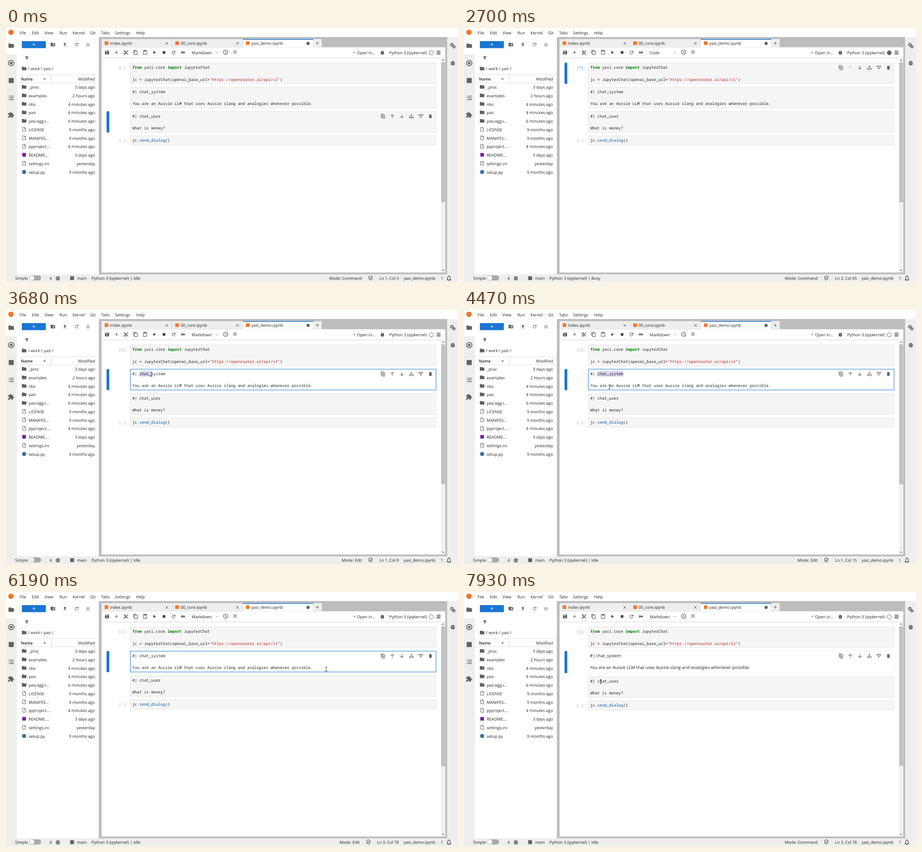
Recreate the animation shown at these times as an HTML page. Size 998 px wide and 561 px high, loop 8 s.

```html
<!DOCTYPE html>
<html lang="en">
<head>
<meta charset="utf-8">
<title>Notebook session</title>
<style>
html, body { margin: 0; width: 100%; height: 100%; overflow: hidden; background: #fff; }
svg { display: block; }
text { font: 9px "Open Sans", "Noto Sans", sans-serif; fill: #212121; white-space: pre; text-rendering: geometricPrecision; }
.mono { font: 8.65px "Noto Sans Mono", "DejaVu Sans Mono", monospace; }
.md { font-size: 9.6px; }
.end { text-anchor: end; }
.head { font-weight: 600; }
.kw { fill: #008000; font-weight: 700; }
.op { fill: #aa22ff; font-weight: 700; }
.str { fill: #ba2121; }
.prop { fill: #0055aa; }
</style>
</head>
<body>
<svg width="998" height="561" viewBox="0 0 998 561"><g id="frame"></g><g id="live"></g></svg>
<script>
const LOOP = 8000, CH = 5.19, BLUE = '#1976d2', GREY = '#616161', DARK = '#424242', GAP = '#bdbdbd', PALE = '#eeeeee';

// Filled icons on a 24 unit grid
const fills = {
  folder: 'M10 4H4c-1.1 0-2 .9-2 2v12c0 1.1.9 2 2 2h16c1.1 0 2-.9 2-2V8c0-1.1-.9-2-2-2h-8z',
  newFolder: 'M20 6h-8l-2-2H4c-1.1 0-2 .9-2 2v12c0 1.1.9 2 2 2h16c1.1 0 2-.9 2-2V8c0-1.1-.9-2-2-2zm-1 8h-3v3h-2v-3h-3v-2h3V9h2v3h3z',
  file: 'M14 2H6c-1.1 0-2 .9-2 2v16c0 1.1.9 2 2 2h12c1.1 0 2-.9 2-2V8zM6 20V4h7v5h5v11z',
  save: 'M17 3H5c-1.1 0-2 .9-2 2v14c0 1.1.9 2 2 2h14c1.1 0 2-.9 2-2V7zm-5 16a3 3 0 110-6 3 3 0 010 6zm3-10H5V5h10z',
  add: 'M19 13h-6v6h-2v-6H5v-2h6V5h2v6h6z',
  cut: 'M9.6 7.6C9.9 7.1 10 6.6 10 6a4 4 0 10-4 4c.6 0 1.1-.1 1.6-.4L10 12l-2.4 2.4A4 4 0 1010 18c0-.6-.1-1.1-.4-1.6L12 14l7 7h3v-1zM6 8a2 2 0 110-4 2 2 0 010 4zm0 12a2 2 0 110-4 2 2 0 010 4zM19 3l-6 6 2 2 7-7V3z',
  copy: 'M16 1H4c-1.1 0-2 .9-2 2v14h2V3h12zm3 4H8c-1.1 0-2 .9-2 2v14c0 1.1.9 2 2 2h11c1.1 0 2-.9 2-2V7c0-1.1-.9-2-2-2zm0 16H8V7h11z',
  paste: 'M19 2h-4.2a3 3 0 00-5.6 0H5c-1.1 0-2 .9-2 2v16c0 1.1.9 2 2 2h14c1.1 0 2-.9 2-2V4c0-1.1-.9-2-2-2zm-7 0a1 1 0 110 2 1 1 0 010-2zm7 18H5V4h2v3h10V4h2z',
  play: 'M7 5v14l11-7z',
  stop: 'M6 6h12v12H6z',
  skip: 'M4 18l8.5-6L4 6zm9-12v12l8.5-6z',
  reload: 'M17.65 6.35A8 8 0 1019.73 14h-2.08A6 6 0 1112 6c1.66 0 3.14.69 4.22 1.78L13 11h7V4z',
  upload: 'M5 20h14v-2H5zM5 10h4v6h6v-6h4l-7-7z',
  bug: 'M20 8h-2.8a6 6 0 00-1.8-2L17 4.4 15.6 3l-2.2 2.2a6 6 0 00-2.8 0L8.4 3 7 4.4 8.6 6a6 6 0 00-1.8 2H4v2h2.1L6 12H4v2h2l.1 2H4v2h2.8a6 6 0 0010.4 0H20v-2h-2.1l.1-2h2v-2h-2l-.1-2H20zm-6 8h-4v-2h4zm0-4h-4v-2h4z',
  funnel: 'M3 4h18l-7 9v8l-4-3v-5z',
  puzzle: 'M20.5 11H19V7c0-1.1-.9-2-2-2h-4V3.5a2.5 2.5 0 00-5 0V5H4c-1.1 0-2 .9-2 2v3.8h1.5a2.7 2.7 0 010 5.4H2V20c0 1.1.9 2 2 2h3.8v-1.5a2.7 2.7 0 015.4 0V22H17c1.1 0 2-.9 2-2v-4h1.5a2.5 2.5 0 000-5z',
  list: 'M2 4h3v3H2zm5 0h15v3H7zm-5 7h3v3H2zm5 0h15v3H7zm-5 7h3v3H2zm5 0h15v3H7z',
  menu: 'M2 3h20v3.5H2zm0 7h20v3.5H2zm0 7h20v3.5H2z',
  trash: 'M6 19c0 1.1.9 2 2 2h8c1.1 0 2-.9 2-2V7H6zM19 4h-3.5l-1-1h-5l-1 1H5v2h14z',
  bell: 'M12 22a2 2 0 002-2h-4a2 2 0 002 2zm6-6v-5c0-3.1-1.6-5.6-4.5-6.3V4a1.5 1.5 0 00-3 0v.7C7.6 5.4 6 7.9 6 11v5l-2 2v1h16v-1zm-2 1H8v-6c0-2.5 1.5-4.5 4-4.5s4 2 4 4.5z',
  shield: 'M12 1L3 5v6c0 5.6 3.8 10.7 9 12 5.2-1.3 9-6.4 9-12V5zm7 10c0 4.5-3 8.7-7 9.9C8 19.7 5 15.5 5 11V6.3l7-3.1 7 3.1zM7.4 11.6L6 13l4 4 8-8-1.4-1.4L10 14.2z',
  recStop: 'M12 1a11 11 0 100 22 11 11 0 000-22zm0 3a8 8 0 110 16 8 8 0 010-16zM8 8v8h8V8z'
};
// Outlined icons on the same grid
const lines = {
  up: 'M12 21V4M4 12l8-8 8 8',
  down: 'M12 3v17M4 12l8 8 8-8',
  above: 'M3 15h18v5H3zM12 13V4M8 8l4-4 4 4',
  below: 'M3 4h18v5H3zM12 11v9M8 16h8',
  dup: 'M8 6h13v16H8zM4 18V2h13M14.500 10v8M10.500 14h8',
  close: 'M5 5l14 14M19 5L5 19',
  chevron: 'M5 9l7 7 7-7',
  clock: 'M12 2a10 10 0 100 20 10 10 0 000-20zM12 6v7l5 2',
  chip: 'M6 6h12v12H6zM10 10h4v4h-4zM9 2v4M15 2v4M9 18v4M15 18v4M2 9h4M2 15h4M18 9h4M18 15h4'
};

const rect = (x, y, w, h, fill, more = '') => `<rect x="${x}" y="${y}" width="${w}" height="${h}" fill="${fill}" ${more}/>`;
const circle = (x, y, r, fill, more = '') => `<circle cx="${x}" cy="${y}" r="${r}" fill="${fill}" ${more}/>`;
const path = (d, more) => `<path d="${d}" ${more}/>`;
const text = (x, y, s, cls = '', more = '') => `<text x="${x}" y="${y}" class="${cls}" ${more}>${s}</text>`;
const square = (x, y, s, fill) => rect(x - s / 2, y - s / 2, s, s, fill);
const span = (cls, s) => `<tspan class="${cls}">${s}</tspan>`;
function icon(name, x, y, size = 11.6, color = GREY) {
  const paint = fills[name] ? `fill="${color}"` : `fill="none" stroke="${color}" stroke-width="2.2"`;
  return path(fills[name] || lines[name], `${paint} transform="translate(${x - size / 2} ${y - size / 2}) scale(${size / 24})"`);
}
const gear = (x, y, r) => circle(x, y, r, 'none', `stroke="${GREY}" stroke-width="1.5"`) +
  circle(x, y, r + 1.2, 'none', `stroke="${GREY}" stroke-width="1.4" stroke-dasharray="${(r + 1.2) * Math.PI / 8}"`);

function menuBar() {
  const items = { File: 30, Edit: 57, View: 85, Run: 118, Kernel: 147, Git: 186, Tabs: 210, Settings: 241, Help: 287 };
  return circle(11, 9.500, 6, '#f37726') + Object.entries(items).map(([s, x]) => text(x, 14, s)).join('');
}

function sideBars() {
  return rect(0, 20, 24, 524, PALE) + rect(0, 20, 24, 38, '#fff') + rect(974, 20, 24, 524, PALE) +
    icon('folder', 11.5, 39, 14.5) + icon('recStop', 11.5, 77.5, 15) + square(11.5, 116, 11, GREY) +
    icon('list', 11.5, 154, 13) + icon('puzzle', 11, 192, 15) +
    gear(984.5, 37, 2.4) + gear(989, 41.5, 1.9) + icon('bug', 986.5, 77.5, 14);
}

function fileBrowser() {
  const files = [
    ['_proc', '3 days ago'], ['examples', '2 hours ago'], ['nbs', '4 minutes ago'], ['yasi', '4 minutes ago'],
    ['yasi.egg-i...', '6 minutes ago'], ['LICENSE', '9 months ago'], ['MANIFES...', '9 months ago'],
    ['pyproject....', '4 minutes ago'], ['README....', '3 days ago'], ['settings.ini', 'yesterday'], ['setup.py', '9 months ago']
  ];
  const rows = files.map(([name, age], i) => {
    const y = 130.5 + 18.75 * i;
    const mark = i < 5 ? icon('folder', 40, y - .5, 12) : i == 8 ? square(40, y - .5, 8, '#7b1fa2') :
      i == 10 ? circle(40, y, 4.5, '#366f9f') : icon('file', 40, y - .5, 11.6);
    return mark + text(50, y + 3.6, name) + text(196.5, y + 3.6, age, 'end');
  });
  return rect(35, 29, 53, 15.5, BLUE, 'rx="1"') + icon('add', 61.5, 36.5, 11, '#fff') +
    icon('newFolder', 103.5, 36.5, 12) + icon('upload', 130, 36.5) + icon('reload', 156, 36.5) + square(181, 37, 7.5, '#c4c4c4') +
    icon('funnel', 46, 66.5, 11) + icon('folder', 40, 89.5, 12) + text(48.5, 93, '/ work / yasi /') +
    rect(24, 102.500, 181, 1, '#e0e0e0') + rect(24, 120.500, 181, 1, '#e0e0e0') + rect(99.5, 104, 1, 17, '#cfcfcf') +
    text(33, 115.8, 'Name', 'head') + path('M82 113.500l3-3 3 3z', `fill="${GREY}"`) + text(196.5, 115.8, 'Modified', 'end') + rows.join('');
}

function dock() {
  const tabs = ['index.ipynb', '00_core.ipynb', 'yasi_demo.ipynb'].map((s, i) => {
    const x = 211 + 156 * i, on = i == 2;
    return rect(x, 24.5, 155.5, 18, on ? '#fff' : PALE) + (on ? rect(x, 24.5, 155.5, 1.6, BLUE) : '') +
      square(x + 10.700, 33.5, 8, '#f37726') + text(x + 18.7, 37.2, s) +
      (on ? circle(667, 34, 3.6, GREY) : icon('close', x + 144, 34, 10, DARK));
  });
  const tools = ['save', 'add', 'cut', 'copy', 'paste', 'play', 'stop', 'reload', 'skip'];
  return rect(205, 20, 769, 524, GAP) + rect(211, 42.5, 759, 497.5, '#fff') + tabs.join('') +
    rect(679, 24.5, 18, 18, PALE) + icon('add', 687.5, 33.5, 12) +
    tools.map((s, i) => icon(s, 223 + 21 * i, 54, 11.6, DARK)).join('') +
    icon('chevron', 466, 54, 8.5) + icon('clock', 485, 53.5, 11.5, DARK) + square(505.5, 53, 8, '#bdbdbd') +
    path('M767 53h4.500l-2.250 2.600z', `fill="${GREY}"`) + text(775, 58, 'Open in...') + icon('bug', 831, 54.5, 11.5, DARK) +
    text(846, 58, 'Python 3 (ipykernel)') + icon('menu', 955, 54.5, 10.5, DARK) +
    rect(211, 65.5, 759, 1, '#d6d6d6') + rect(211, 66.5, 759, 1, '#f1f1f1') +
    rect(960.5, 66.5, 9.5, 473.5, '#f1f1f1') + path('M962.800 72l2.400-2.600 2.400 2.600zM962.800 534l2.400 2.600 2.400-2.600z', 'fill="#606060"');
}

function statusBar() {
  return rect(0, 544, 998, 17, PALE) + text(20, 556.3, 'Simple') + rect(52, 546.5, 25.5, 11, '#a8a8a8', 'rx="5.500"') +
    circle(57.5, 552, 4.8, '#fff') + text(96, 556.3, '4') + icon('chip', 114.5, 553, 11.500, DARK) +
    square(146, 552.5, 8.5, GREY) + text(157, 556.3, 'main') +
    text(948, 556.3, 'yasi_demo.ipynb', 'end') + text(960, 556.3, '1') + icon('bell', 978, 552.5, 15, DARK);
}

// Each move: start, end, number of hops, destination x, y
const moves = [
  [3070, 3430, 5, 303, 150], [3620, 3620, 1, 297, 142], [3680, 3840, 3, 370, 142], [4210, 4280, 2, 340, 184],
  [4470, 4470, 1, 321, 170], [4560, 5230, 8, 697, 170.5], [5310, 5310, 1, 707, 170.5],
  [6990, 7400, 5, 267, 197], [7480, 7630, 3, 299, 199], [7830, 7930, 2, 302, 198]
];
function pointer(t) {
  let x = 420, y = 235;
  for (const [from, to, n, tx, ty] of moves) {
    if (t < from) break;
    const k = t >= to ? n : 1 + Math.floor((t - from) / (to - from) * (n - 1));
    x += (tx - x) * k / n;
    y += (ty - y) * k / n;
    if (k < n) break;
  }
  return [x, y];
}

function drawPointer(x, y, beam) {
  return beam
    ? path(`M${x - 2} ${y - 4.5}h4M${x} ${y - 4.5}v9M${x - 2} ${y + 4.5}h4`, 'fill="none" stroke="#222" stroke-width=".9"')
    : path(`M${x - .5} ${y - .5}v8.600l2-1.800 1.400 3 1.300-.6-1.400-2.900h2.600z`, 'fill="#fff" stroke="#222" stroke-width=".8"');
}

const code = [
  [span('kw', 'from') + ' yasi.core ' + span('kw', 'import') + ' JupyterChat',
    'jc ' + span('op', '=') + ' JupyterChat(openai_base_url=' + span('str', '"https://openrouter.ai/api/v1"') + ')'],
  ['#| chat_system', 'You are an Aussie LLM that uses Aussie slang and analogies whenever possible.'],
  ['#| chat_user', 'What is money?'],
  ['jc.' + span('prop', 'send_dialog') + '()']
];

function scene(t) {
  const active = t < 1300 ? 2 : t < 3680 ? 0 : 1;
  const edit = t >= 1300 && t < 2700 || t >= 3680 && t < 6400;
  const done = t >= 6400, busy = t >= 2700 && t < 2980;
  const chosen = t < 3680 || t >= 5510 ? 0 : t < 3770 ? 5 : t < 3840 ? 9 : 11;
  const drop = done ? 2.2 : 0;
  const boxes = [[77, 46], [130.700, 46 + drop], [184.4 + drop, 46], [238 + drop, 20.5]];
  let out = '';

  boxes.forEach(([y, h], i) => {
    const on = i == active, live = on && edit, plain = done && i == 1;
    out += rect(274.5, y, 675, h, live || plain ? '#fff' : '#f5f5f5',
      `stroke="${live ? BLUE : plain ? '#eeeeee' : '#e0e0e0'}" stroke-width="${live ? 1 : .8}"`);
    if (on) out += rect(222, y - .3, 6, h + .6, BLUE, 'rx="1"');
    if (i == 0 || i == 3) {
      const label = i || t < 2700 ? ' ' : busy ? '*' : '1';
      out += text(249, y + 14, `[${label}]:`, 'mono', `style="fill:${on ? '#307fc1' : '#9e9e9e'}"`);
    }
    if (i == 0 && live) {
      for (const col of [16, 63]) out += rect(279 + col * CH, y + 30.500, CH, 12, '#bbdcd8');
      out += rect(611, y + 30.5, 1, 12, '#000');
    }
    if (i == 1 && chosen) out += rect(279 + 3 * CH, y + 4.3, chosen * CH, 12, '#d7d4f0');
    if (i == 1 && t >= 5510 && t < 6190) out += rect(678.2, y + 30.5, 1, 12, '#000');
    code[i].forEach((s, n) => {
      out += plain ? text(278, y + 12.8 + 26.3 * n, s, 'md') : text(279, y + 13.2 + 26.4 * n, s, 'mono');
    });
    if (on) ['dup', 'up', 'down', 'above', 'below', 'trash'].forEach((s, n) => {
      out += icon(s, 832 + 21 * n, y + 10.5, 11.2, s == 'up' && i == 0 ? '#c4c4c4' : GREY);
    });
  });

  const [ln, col] = t < 1300 ? [1, 3] : t < 3680 ? [3, 65] : t < 5510 ? [1, 4 + chosen] : [3, 78];
  const left = col < 10 ? 824 : 819;
  out += rect(961, 76, 8.5, done ? 308 : 309, '#c1c1c1') +
    text(410, 58, active ? 'Markdown' : 'Code') +
    circle(939, 54.8, 4.7, busy ? GREY : 'none', `stroke="${GREY}"`) +
    text(188.5, 556.3, 'Python 3 (ipykernel) | ' + (busy ? 'Busy' : 'Idle')) +
    text(left - 38, 556.3, 'Mode: ' + (edit ? 'Edit' : 'Command'), 'end') +
    icon('shield', left - 19, 552, 11.6, DARK) + text(867.5, 556.3, `Ln ${ln}, Col ${col}`, 'end');

  if (t >= 3070) {
    const [x, y] = pointer(t);
    const beam = x > 274 && boxes.some(([top, h], i) => y > top && y < top + h && !(done && i == 1));
    out += drawPointer(x, y, beam);
  }
  return out;
}

const live = document.getElementById('live');
let last = '';
function tick() {
  const next = scene(performance.now() % LOOP);
  if (next != last) live.innerHTML = last = next;
  requestAnimationFrame(tick);
}
document.getElementById('frame').innerHTML = menuBar() + sideBars() + fileBrowser() + dock() + statusBar();
tick();
</script>
</body>
</html>
```
